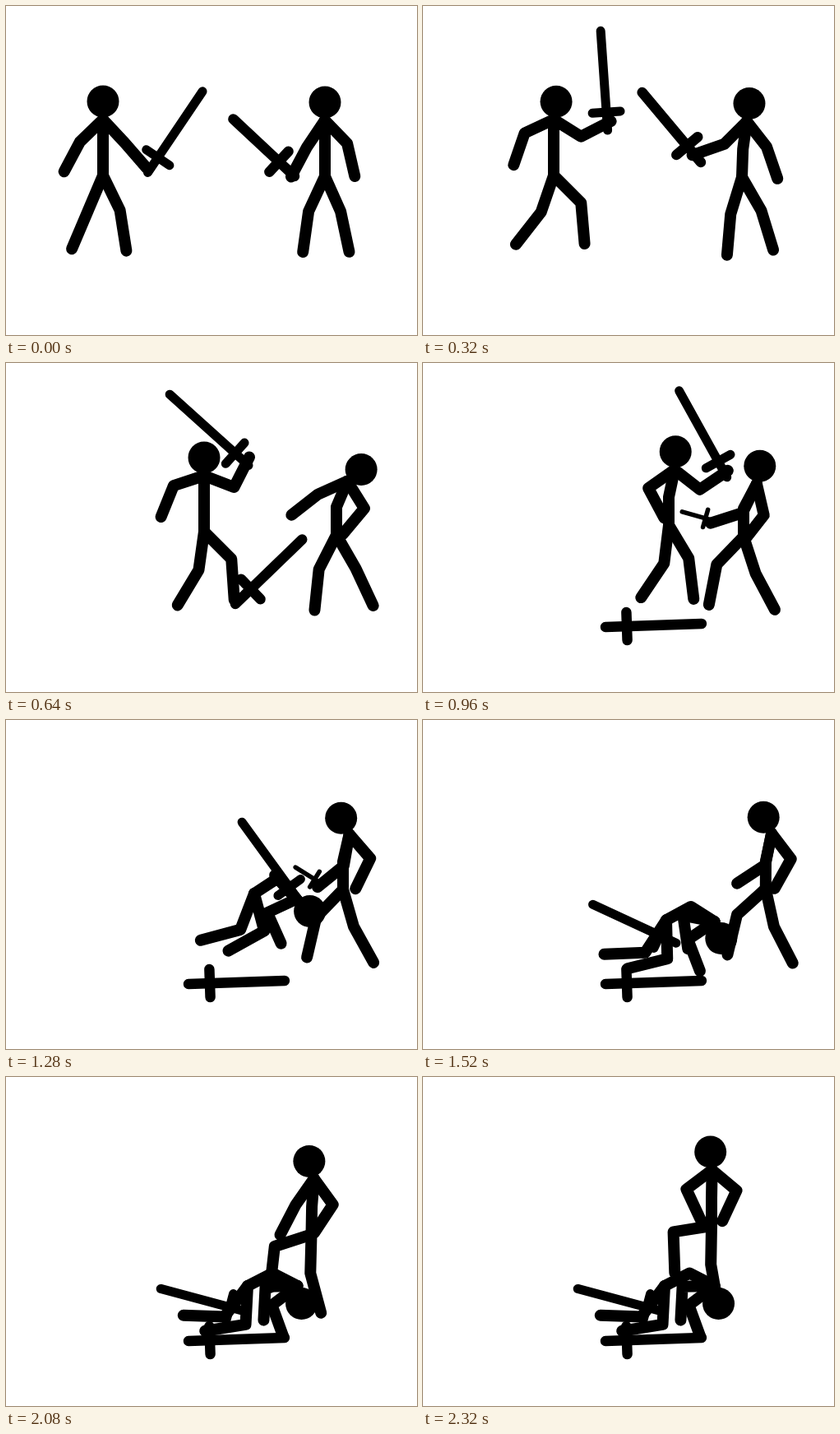
Write an HTML page with a canvas that moves like this. It is 500 px wide and 400 px high and loops after 2960 ms.

```html
<!DOCTYPE html>
<html lang="en">
<head>
<meta charset="utf-8">
<title>Stick duel</title>
<style>
html, body { margin: 0; width: 100%; height: 100%; overflow: hidden; background: #fff; }
canvas { display: block; }
</style>
</head>
<body>
<canvas id="stage" width="500" height="400"></canvas>
<script>
const ctx = document.getElementById('stage').getContext('2d');
const LOOP = 2960, STEP = 80, LAST = 2320;
const SPINE = 34, NECK = 22, ARM = [39, 41], LEG = [47, 50];

// A key is a time, its values and the easing power of the way to it.
const key = (t, values, power = 1) => ({ t, values, power });

// Body values: hip, then degrees (0 right, 90 down) for
// spine, chest, head, arm A, arm B, leg A, leg B.
const left = [
  key(0, [118, 206, -90, -90, -90, 136, 118, 47, 49, 113, 113, 64, 81]),
  key(320, [159, 206, -90, -90, -82, 155, 109, 32, -27, 109, 128, 45, 85]),
  key(640, [241, 205, -90, -90, -90, 162, 112, 21, -63, 98, 121, 45, 86]),
  key(960, [299, 197, -90, -78, -87, 145, 62, 38, -34, 97, 124, 59, 83]),
  key(1280, [302, 211, -33, 48, 42, 155, 66, -132, 48, 111, 165, 75, 151], 2),
  key(1600, [294, 254, -27, 27, 77, 143, 70, -181, 93, 127, 182, 93, 171])
];

const stab = [410, 206, -90, -77, -117, 49, 116, 100, 141, 134, 103, 74, 61];
const right = [
  key(0, [388, 207, -90, -90, -90, 46, 77, 124, 118, 115, 98, 66, 78]),
  key(320, [388, 208, -88, -82, -82, 52, 71, 135, 161, 107, 95, 60, 73]),
  key(640, [402, 209, -90, -67, -40, 58, 130, 156, 142, 117, 96, 60, 65]),
  key(960, [390, 211, -90, -62, -80, 77, 128, 116, 162, 134, 101, 72, 62]),
  key(1280, stab),
  key(1440, [423, ...stab.slice(1)]),
  key(1840, [392, 202, -88, -82, -116, 68, 132, 107, 170, 153, 105, 92, 70]),
  key(2320, [351, 181, -90, -89, -95, 40, 115, 143, 65, 171, 88, 91, 80])
];

// Blade values: pommel, degrees, length. Held blades count from the hand.
const leftSword = [
  key(0, [1, 5, -56, 119]),
  key(320, [-4, 11, -94, 121]),
  key(640, [-1, 10, -138, 129]),
  key(720, [-2, 8, -162, 120]),
  key(960, [-1, 8, -119, 120]),
  key(1280, [3, 2, -126, 120], 2),
  key(1600, [-20, -10, -165, 109])
];
const rightSword = [
  key(0, [351, 207, -137, 102]),
  key(320, [338, 190, -130, 111]),
  key(640, [279, 293, -44, 113]),
  key(800, [222, 321, -2, 117])
];
const dagger = [
  key(960, [0, -4, 196, 36]),
  key(1280, [2, -6, 212, 34])
];

function sample(track, t) {
  const i = Math.max(1, track.findIndex(k => k.t > t));
  const [a, b] = t >= track.at(-1).t ? track.slice(-2) : [track[i - 1], track[i]];
  const k = Math.min(1, Math.max(0, (t - a.t) / (b.t - a.t))) ** b.power;
  return a.values.map((v, n) => v + (b.values[n] - v) * k);
}

function step([x, y], degrees, length) {
  const a = degrees * Math.PI / 180;
  return [x + length * Math.cos(a), y + length * Math.sin(a)];
}

function line(width, ...points) {
  ctx.lineWidth = width;
  ctx.beginPath();
  points.forEach(p => ctx.lineTo(...p));
  ctx.stroke();
}

function limb(from, angles, lengths) {
  const joint = step(from, angles[0], lengths[0]);
  const end = step(joint, angles[1], lengths[1]);
  line(14, from, joint, end);
  return end;
}

// Draws a fighter and returns the hand that holds the weapon.
function drawBody(track, t) {
  const [x, y, ...turn] = sample(track, t);
  const hip = [x, y];
  const neck = limb(hip, turn, [SPINE, SPINE]);
  limb(neck, turn.slice(3), ARM);
  const hand = limb(neck, turn.slice(5), ARM);
  limb(hip, turn.slice(7), LEG);
  limb(hip, turn.slice(9), LEG);
  ctx.beginPath();
  ctx.arc(...step(neck, turn[2], NECK), 19.5, 0, Math.PI * 2);
  ctx.fill();
  return hand;
}

function drawBlade(track, t, [x, y], width, at, half) {
  const [dx, dy, turn, length] = sample(track, t);
  const pommel = [x + dx, y + dy];
  const guard = step(pommel, turn, at);
  line(width, pommel, step(pommel, turn, length));
  line(width, step(guard, turn + 90, half), step(guard, turn - 90, half));
}

function draw(t) {
  ctx.fillStyle = '#fff';
  ctx.fillRect(0, 0, 500, 400);
  ctx.fillStyle = ctx.strokeStyle = '#000';
  ctx.lineCap = ctx.lineJoin = 'round';

  drawBlade(leftSword, t, drawBody(left, t), 11, 22, 17);
  const hand = drawBody(right, t);
  drawBlade(rightSword, t, [0, 0], 12.5, 26, 17);
  if (t >= 800 && t < 1440) drawBlade(dagger, t, hand, 5.5, 6.5, 11);
}

const start = performance.now();
function tick() {
  const t = (performance.now() - start) % LOOP;
  draw(Math.min(LAST, Math.floor(t / STEP) * STEP));
  requestAnimationFrame(tick);
}
tick();
</script>
</body>
</html>
```
